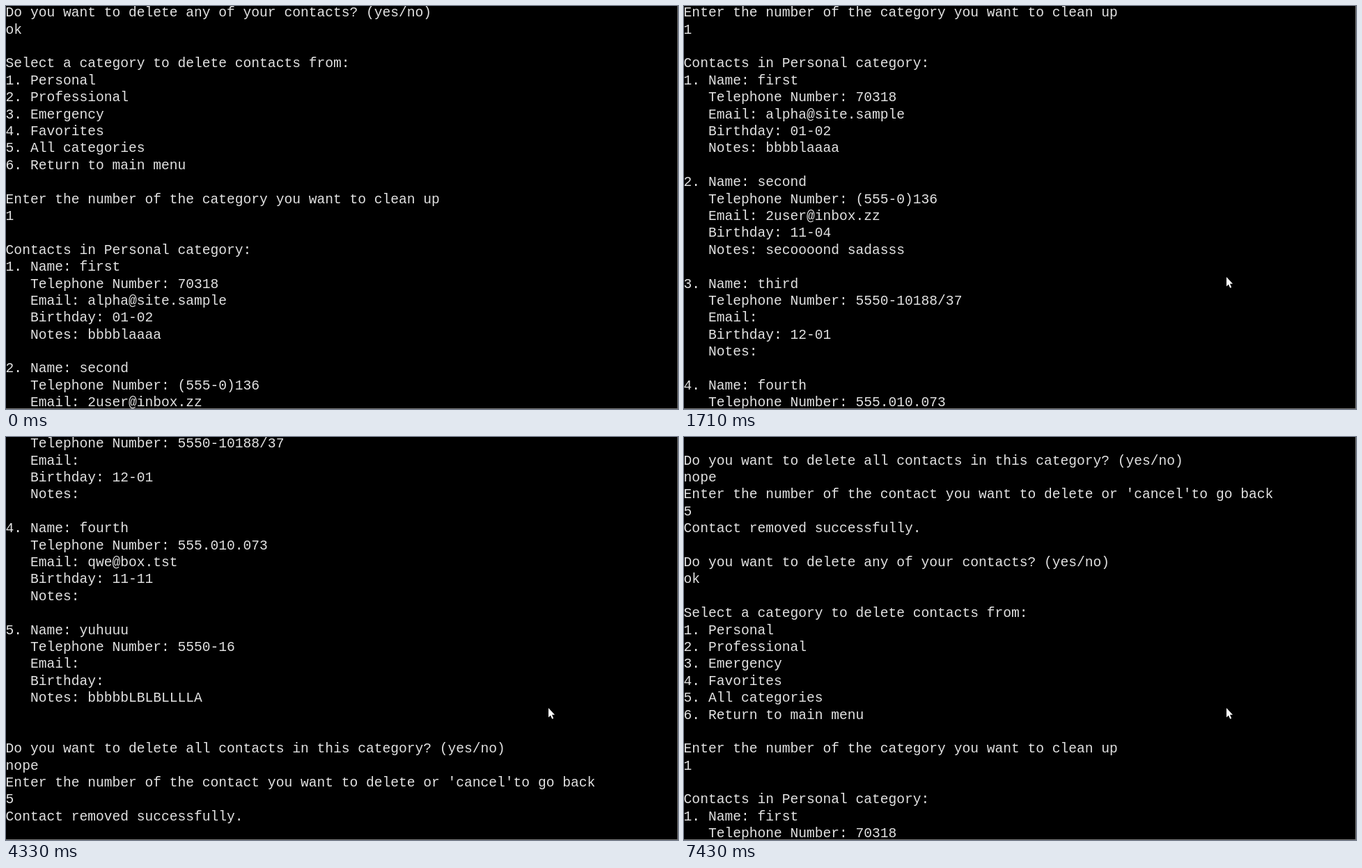
These frames come from a looping animation (965 by 580 pixels, 8000 ms). An HTML page:

```html
<!DOCTYPE html>
<html lang="en">
<head>
<meta charset="utf-8">
<title>Contact list console</title>
<style>
  html, body { margin: 0; width: 100%; height: 100%; overflow: hidden; background: #000; }
  svg { display: block; width: 965px; height: 580px; }
  text { font: 19.6px "Courier New", "Liberation Mono", monospace; fill: #e2e2e2; white-space: pre; }
</style>
</head>
<body>
<svg viewBox="0 0 965 580">
  <rect width="965" height="580" fill="#000"/>
  <g id="screen"></g>
  <path id="pointer" d="M0 0V13.4L3 10.7L5.2 15.8L7.2 14.9L5 9.8H9Z" fill="#fff"/>
  <rect x="964" width="1" height="580" fill="#777"/>
  <rect y="579" width="965" height="1" fill="#777"/>
</svg>
<script>
const LOOP = 8000, ROWS = 24, PITCH = 24.39, BASELINE = 15.3;

const contact = (number, name, phone, email, birthday, notes) => [
  `${number}. Name: ${name}`,
  `   Telephone Number: ${phone}`,
  `   Email: ${email}`,
  `   Birthday: ${birthday}`,
  `   Notes: ${notes}`,
  ''
];

const menu = [
  'Do you want to delete any of your contacts? (yes/no)',
  'ok',
  '',
  'Select a category to delete contacts from:',
  '1. Personal',
  '2. Professional',
  '3. Emergency',
  '4. Favorites',
  '5. All categories',
  '6. Return to main menu',
  '',
  'Enter the number of the category you want to clean up',
  '1',
  '',
  'Contacts in Personal category:',
  ...contact(1, 'first', '70318', 'alpha@site.sample', '01-02', 'bbbblaaaa')
];

const lines = [
  ...menu,
  ...contact(2, 'second', '(555-0)136', '2user@inbox.zz', '11-04', 'secoooond sadasss'),
  ...contact(3, 'third', '5550-10188/37', '', '12-01', ''),
  ...contact(4, 'fourth', '555.010.073', 'qwe@box.tst', '11-11', ''),
  ...contact(5, 'yuhuuu', '5550-16', '', '', 'bbbbbLBLBLLLLA'),
  '',
  'Do you want to delete all contacts in this category? (yes/no)',
  'nope',
  "Enter the number of the contact you want to delete or 'cancel'to go back",
  '5',
  'Contact removed successfully.',
  '',
  ...menu
];

// [time in ms, first visible line]
const scrolls = [[0, 0], [1280, 6], [1710, 11], [2310, 17], [3060, 22],
                 [4330, 28], [5080, 34], [6060, 39], [7430, 45]];

const ENTER = 110, SETTLE = 480, STEPS = 11, TURN = 8;
const start = [894, 572], overshoot = [767, 378], rest = [779, 390];

const screen = document.getElementById('screen');
const pointer = document.getElementById('pointer');
const rows = Array.from({ length: ROWS }, (_, i) => {
  const row = document.createElementNS('http://www.w3.org/2000/svg', 'text');
  row.setAttribute('x', -0.4);
  row.setAttribute('y', BASELINE + i * PITCH);
  return screen.appendChild(row);
});

const mix = (a, b, p) => a.map((v, i) => Math.round(v + (b[i] - v) * p));
const easeOut = p => 1 - (1 - p) ** 2;

function pointerAt(t) {
  const progress = Math.min(1, (t - ENTER) / (SETTLE - ENTER));
  const step = Math.floor(progress * STEPS + 1e-6);
  return step <= TURN
    ? mix(start, overshoot, easeOut(step / TURN))
    : mix(overshoot, rest, easeOut((step - TURN) / (STEPS - TURN)));
}

let shownTop = -1;
function render(t) {
  const top = scrolls.filter(([at]) => at <= t).pop()[1];
  if (top !== shownTop) {
    rows.forEach((row, i) => { row.textContent = lines[top + i]; });
    shownTop = top;
  }
  pointer.style.display = t < ENTER ? 'none' : '';
  if (t >= ENTER) pointer.setAttribute('transform', `translate(${pointerAt(t)})`);
}

const begin = performance.now();
function tick() {
  render((performance.now() - begin) % LOOP);
  requestAnimationFrame(tick);
}
tick();
</script>
</body>
</html>
```
